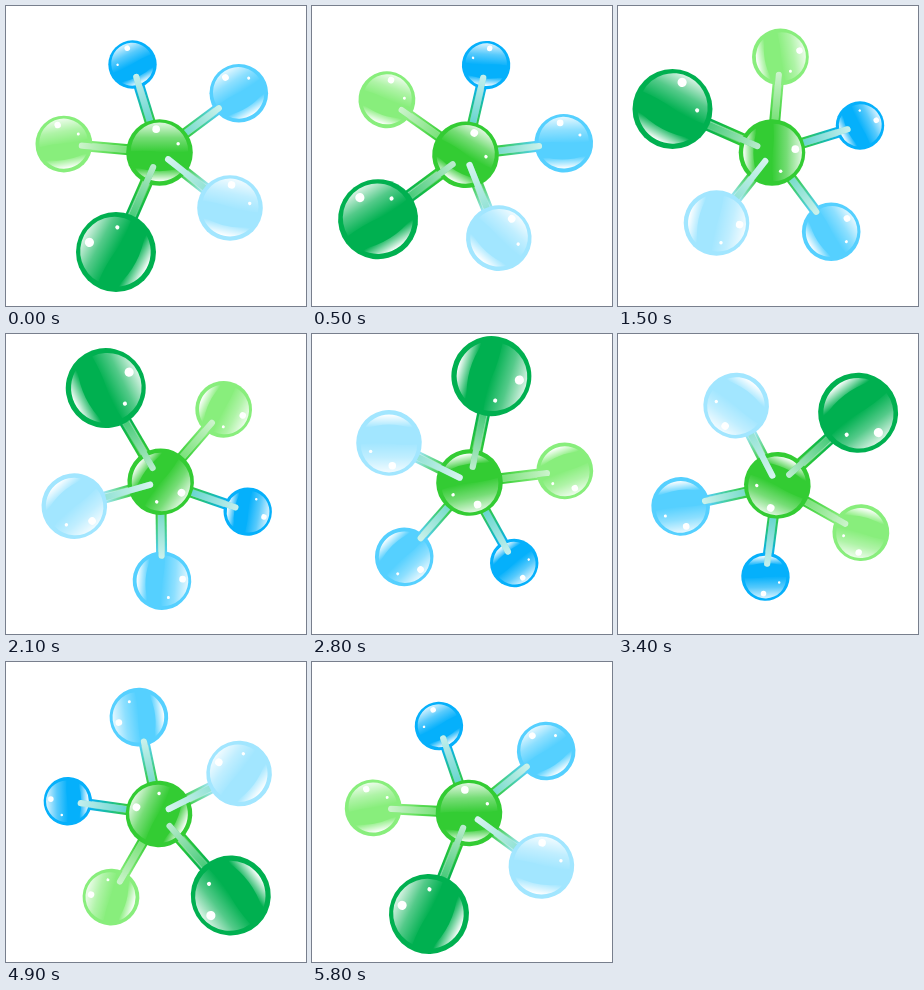
An HTML page for the animation above (5900 ms loop, 300x300 px).

```html
<!DOCTYPE html>
<html lang="en">
<head>
<meta charset="utf-8">
<title>Turning molecule</title>
<style>
  html, body { margin: 0; width: 100%; height: 100%; overflow: hidden; background: #fff; }
  svg { display: block; width: 100vw; height: 100vh; }
</style>
</head>
<body>
<svg viewBox="0 0 300 300">
  <defs>
    <linearGradient id="dome" x1="0" y1="0" x2="0" y2="1">
      <stop offset="0" stop-color="#fff" stop-opacity=".85"/>
      <stop offset=".5" stop-color="#fff" stop-opacity=".33"/>
      <stop offset="1" stop-color="#fff" stop-opacity="0"/>
    </linearGradient>
    <linearGradient id="glow" x1="0" y1="0" x2="0" y2="1">
      <stop offset=".1" stop-color="#fff" stop-opacity="0"/>
      <stop offset="1" stop-color="#fff"/>
    </linearGradient>
    <linearGradient id="shine" x1="0" y1="0" x2="0" y2="1">
      <stop offset=".14" stop-color="#fff" stop-opacity="0"/>
      <stop offset=".3" stop-color="#fff" stop-opacity=".6"/>
      <stop offset=".5" stop-color="#fff" stop-opacity=".2"/>
      <stop offset=".72" stop-color="#fff" stop-opacity=".75"/>
      <stop offset=".86" stop-color="#fff" stop-opacity="0"/>
    </linearGradient>
    <linearGradient id="tip" x1="0" y1="0" x2="1" y2="0">
      <stop offset="0" stop-color="#fff" stop-opacity=".68"/>
      <stop offset="1" stop-color="#fff" stop-opacity=".05"/>
    </linearGradient>
    <g id="gloss">
      <path d="M-.86-.04A.86.86 0 0 1 .86-.04Q.4 .04 0-.02T-.86-.04Z" fill="url(#dome)"/>
      <path d="M-.76 .42A.87.87 0 0 0 .76 .42Q0 .7-.76 .42Z" fill="url(#glow)"/>
      <circle cx="-.1" cy="-.7" r=".115" fill="#fff"/>
      <circle cx=".56" cy="-.26" r=".052" fill="#fff"/>
    </g>
  </defs>
  <g id="molecule"></g>
</svg>
<script>
const STEP = 100, STEPS = 59;
const molecule = document.getElementById('molecule');
const defs = document.querySelector('defs');

function add(parent, tag, attrs) {
  const node = document.createElementNS('http://www.w3.org/2000/svg', tag);
  for (const key in attrs) node.setAttribute(key, attrs[key]);
  return parent.appendChild(node);
}

function ball({ x, y, r, fill, turn, flip = 1 }) {
  add(molecule, 'circle', { cx: x, cy: y, r, fill });
  add(molecule, 'use', {
    href: '#gloss',
    transform: `translate(${x} ${y}) rotate(${turn}) scale(${r * flip} ${r})`
  });
}

// Places a group so that its x axis runs from the core to the ball.
const along = ({ x, y }) => `rotate(${Math.atan2(y, x) * 180 / Math.PI})`;

// The tube blends from the core's green to the ball's colour.
function tube(atom) {
  const { x, y, r, fill, width } = atom;
  const from = 22, to = Math.hypot(x, y) - r + 3;
  const id = 'tube' + fill.slice(1);
  const blend = add(defs, 'linearGradient', { id });
  add(blend, 'stop', { offset: 0.15, 'stop-color': core.fill });
  add(blend, 'stop', { offset: 1, 'stop-color': fill });
  for (const paint of [id, 'shine']) {
    add(molecule, 'rect', {
      x: from, y: -width / 2, width: to - from, height: width,
      transform: along(atom), fill: `url(#${paint})`
    });
  }
}

// Rounded rod core, brightest at its tip, which overlaps a ball.
function rod(atom, tip, end, tint) {
  const half = 3.1, length = Math.abs(end - tip);
  const group = add(molecule, 'g', {
    transform: `${along(atom)} translate(${tip} 0) scale(${Math.sign(end - tip)} 1)`
  });
  const d = `M0 ${-half}H${length}V${half}H0A${half} ${half} 0 0 1 0 ${-half}Z`;
  add(group, 'path', { d, fill: tint });
  add(group, 'path', { d, fill: 'url(#tip)' });
}

const blue = { x: -27, y: -88, r: 24.2, fill: '#05b0fb', turn: -26, flip: -1, width: 11 };
const sky = { x: 79.3, y: -59.2, r: 29.3, fill: '#55d0ff', turn: -32, width: 11 };
const lime = { x: -95.6, y: -8.4, r: 28.4, fill: '#88ee7c', turn: -10, width: 11 };
const pale = { x: 70.5, y: 55.5, r: 32.8, fill: '#a2e6ff', turn: 12, width: 12 };
const green = { x: -43.5, y: 99.5, r: 40, fill: '#00b050', turn: -62, width: 13 };
const core = { x: 0, y: 0, r: 33.3, fill: '#33cc33', turn: 0 };

[blue, sky, lime, pale, green].forEach(tube);
[blue, sky, lime].forEach(ball);
rod(blue, 79, 25, '#4fcfc8');
rod(sky, 74, 25, '#62d6c4');
rod(lime, 78, 25, '#66dd66');
ball(core);
rod(pale, 11, 64, '#86dfd0');
rod(green, 16, 76, '#30c468');
[pale, green].forEach(ball);

// Step, angle, centre x, centre y.
const poses = [
  [0, 0, 153.5, 146.5], [5, 30, 153.5, 148.8], [9, 54, 153, 147], [15, 90, 154, 146.5],
  [24, 144, 155, 148.3], [28, 168, 157.5, 148.5], [30, 180.2, 160, 150], [36, 216.6, 159, 152],
  [41, 247, 152.5, 153], [49, 295, 153, 152], [54, 326, 154, 151.5], [58, 358, 157, 151]
];

function poseAt(step) {
  const i = Math.max(1, poses.findIndex(pose => pose[0] >= step));
  const [from, to] = [poses[i - 1], poses[i]];
  const part = (step - from[0]) / (to[0] - from[0]);
  return from.map((value, k) => value + (to[k] - value) * part);
}

function draw(time) {
  const step = Math.floor(time / STEP) % STEPS;
  const [, angle, x, y] = poseAt(step);
  molecule.setAttribute('transform', `translate(${x} ${y}) rotate(${angle})`);
}

const start = performance.now();
function tick() {
  draw(performance.now() - start);
  requestAnimationFrame(tick);
}
tick();
</script>
</body>
</html>
```
